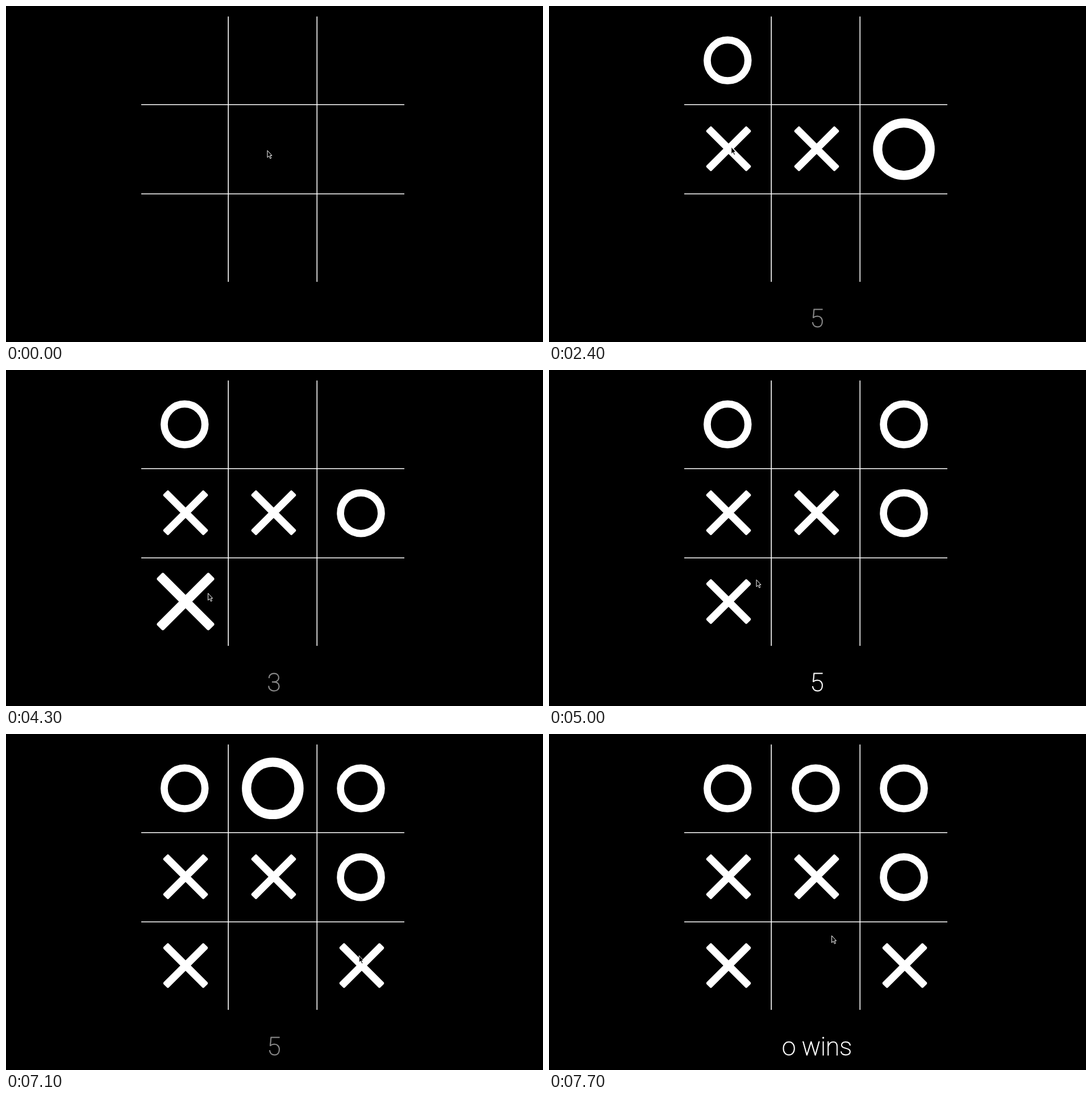
An HTML page for the animation above (9100 ms loop, 945 by 592 pixels).

```html
<!DOCTYPE html>
<html lang="en">
<head>
<meta charset="utf-8">
<title>Tic-tac-toe</title>
<style>
  html, body { margin: 0; width: 100%; height: 100%; overflow: hidden; background: #000; }
  svg { display: block; width: 945px; height: 592px; }
  .grid { stroke: #fff; stroke-width: 1.6; }
  .o { fill: none; stroke: #fff; stroke-width: 12.7; }
  .x { fill: #fff; }
  .pointer { fill: #000; stroke: #fff; stroke-width: 1; stroke-linejoin: round; }
  text {
    font: 100 44px Roboto, sans-serif; text-anchor: middle;
    fill: currentColor; stroke: currentColor; stroke-width: .9;
  }
</style>
</head>
<body>
<svg viewBox="0 0 945 592">
  <defs>
    <circle id="o" class="o" r="35.9"/>
    <g id="x" class="x">
      <rect x="-50.5" y="-6.5" width="101" height="13" rx="2.5" transform="rotate(45)"/>
      <rect x="-50.5" y="-6.5" width="101" height="13" rx="2.5" transform="rotate(-45)"/>
    </g>
  </defs>
  <path id="grid" class="grid"/>
  <g id="marks"></g>
  <text id="status" x="471.5" y="565.7"></text>
  <path id="pointer" class="pointer" d="M0 0V12.3L2.8 9.6L4.9 14.2L6.8 13.3L4.8 8.9H8Z"/>
</svg>
<script>
const LOOP = 9100, STEP = 100;
const REPLY = 460, POP = 100, RESET = 300, SECOND = 900, WIN = 7200;
const $ = id => document.getElementById(id);

// Each round: time of the x, its cell, and the cell of the o that answers
const rounds = [
  { at: 40, x: 4, o: 0 },
  { at: 1900, x: 3, o: 5 },
  { at: 4300, x: 6, o: 2 },
  { at: 6600, x: 8, o: 1 }
];

// Pointer glides along curves, resting between them
const home = [460, 254.6];
const glides = [
  { from: 750, till: 1600, to: [320.8, 248.4] },
  { from: 2400, till: 4100, to: [355.6, 393.4], via: [600, -20] },
  { from: 4900, till: 6000, to: [621.3, 390.5], via: [560, -130] },
  { from: 7100, till: 7570, to: [497.6, 355.4] }
];

function addMark(type, cell, at) {
  const node = document.createElementNS('http://www.w3.org/2000/svg', 'use');
  node.setAttribute('href', '#' + type);
  $('marks').append(node);
  const col = cell % 3, row = Math.floor(cell / 3);
  const [x, y] = type === 'x' ? [316 + 155 * col, 95 + 156.5 * row]
                              : [314.3 + 155.1 * col, 95.8 + 156.4 * row];
  return { node, at, col, x, y };
}

const marks = rounds.flatMap(r => [addMark('x', r.x, r.at), addMark('o', r.o, r.at + REPLY)]);

function pointerAt(t) {
  let pos = home;
  for (const { from, till, to, via } of glides) {
    if (t < from) break;
    const u = Math.min(1, (t - from) / (till - from));
    const s = u * u * (3 - 2 * u);
    pos = pos.map((p, i) => {
      const bend = via ? via[i] : (p + to[i]) / 2;
      return (1 - s) ** 2 * p + 2 * s * (1 - s) * bend + s * s * to[i];
    });
  }
  return pos;
}

// Five-second countdown, restarted shortly after every x
function statusAt(t) {
  if (t >= WIN) return 'o wins';
  if (t < rounds[0].at) return '';
  const reset = rounds.map(r => r.at + RESET).filter(at => at <= t).pop() ?? t;
  return String(5 - Math.floor((t - reset) / SECOND));
}

function draw(t) {
  // The board flinches slightly on the win
  const k = Math.max(0, 1 - Math.abs(t - 7500) / 200);
  const left = 238 - k, right = 701 - 2.5 * k, bottom = 486 - 1.7 * k;
  const x1 = 391.2 - 2 * k, x2 = 547.3 - .8 * k, y1 = 173.7 - 1.6 * k, y2 = 331;
  $('grid').setAttribute('d',
    `M${left} ${y1}H${right}M${left} ${y2}H${right}M${x1} 18.5V${bottom}M${x2} 18.5V${bottom}`);

  for (const { node, at, col, x, y } of marks) {
    const shift = .9 * k * (1 + Math.abs(col - 1));
    const scale = t - at < POP ? 1.285 : 1;
    node.style.display = t < at ? 'none' : '';
    node.setAttribute('transform', `translate(${x - shift} ${y}) scale(${scale})`);
  }

  // Dim while the reply is pending
  const waiting = rounds.some(r => t >= r.at && t < r.at + REPLY + POP);
  const label = statusAt(t);
  const status = $('status');
  if (status.textContent !== label) status.textContent = label;
  status.style.color = waiting ? '#8a8a8a' : '#fff';

  $('pointer').setAttribute('transform', `translate(${pointerAt(t)})`);
}

const start = performance.now();
function tick() {
  const t = (performance.now() - start) % LOOP;
  draw(Math.floor(t / STEP) * STEP);
  requestAnimationFrame(tick);
}
tick();
</script>
</body>
</html>
```
